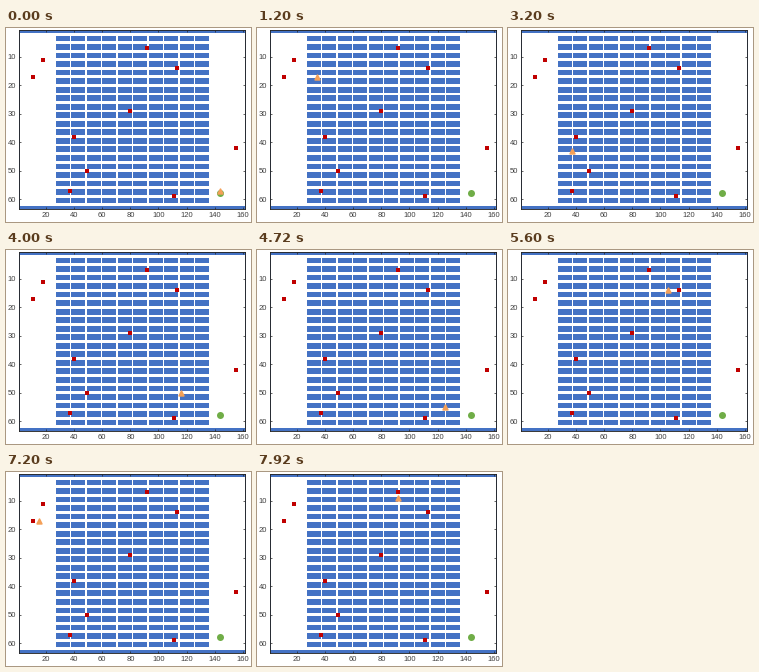
Recreate the animation shown at these times as a matplotlib script. Size 245 by 194 pixels, loop 8000 ms.

```python
import numpy as np
import matplotlib.pyplot as plt
from matplotlib.animation import FuncAnimation
from matplotlib.colors import ListedColormap
from matplotlib.markers import MarkerStyle

W, H, DPI = 245, 194, 100
PT = 72 / DPI
COLS, ROWS = 161, 63
BLUE, RED, GREEN, ORANGE = "#4472C4", "#C00000", "#70AD47", "#F4A058"
FRAMES, INTERVAL, CELLS_PER_FRAME = 100, 80, 10

HOME = (144, 58)
ITEMS = [(11, 17), (18, 11), (92, 7), (113, 14), (80, 29),
         (40, 38), (37, 57), (49, 50), (155, 42), (111, 59)]

# Outer wall, then shelves of 10 by 2 cells with one-cell aisles between them.
row, col = np.mgrid[1:ROWS + 1, 1:COLS + 1]
wall = (row == 1) | (row == ROWS) | (col == 1) | (col == COLS)
shelf = (abs(col - 81) <= 54) & (abs(row - 32) < 30) & (col % 11 != 4) & (row % 3 != 2)
blocked = wall | shelf


def neighbours(cell):
    """Free cells next to this one, sideways moves first."""
    x, y = cell
    around = [(x - 1, y), (x + 1, y), (x, y - 1), (x, y + 1)]
    return [(a, b) for a, b in around if not blocked[b - 1, a - 1]]


def shortest_path(start, goal):
    """Breadth-first search back from the goal, then walk downhill to it."""
    distance, queue = {goal: 0}, [goal]
    for cell in queue:
        if cell == start:
            break
        for near in neighbours(cell):
            if near not in distance:
                distance[near] = distance[cell] + 1
                queue.append(near)
    path, cell = [], start
    while cell != goal:
        cell = next(n for n in neighbours(cell) if distance.get(n) == distance[cell] - 1)
        path.append(cell)
    return path or [goal]


# Items in picking order with a few turning points; a repeat is a one-step stop.
pick = ITEMS
upper = [(18, 8), pick[2]]
middle = [pick[3]] * 3 + [(92, 23)] + pick[4:7]
route = [HOME, (144, 17), *pick[:2], *upper, pick[2], *middle,
         pick[7], (137, 42), pick[8], (125, 55), pick[9], pick[9],
         pick[2], *middle,
         (18, 20), pick[0], pick[0], pick[1], pick[1], *upper, (92, 23)]
steps = [HOME]
for start, goal in zip(route, route[1:]):
    steps += shortest_path(start, goal)

fig = plt.figure(figsize=(W / DPI, H / DPI), dpi=DPI, facecolor="white")
left, right, top, bottom = 12.5, 239, 2, 181
ax = fig.add_axes([left / W, 1 - bottom / H, (right - left) / W, (bottom - top) / H])
ax.imshow(blocked, cmap=ListedColormap(["white", BLUE]), aspect="auto",
          interpolation="nearest", extent=(0.5, COLS + 0.5, ROWS + 0.5, 0.5))


def marker(cells, shape, color, size, zorder, edge=0):
    xs, ys = zip(*cells)
    line, = ax.plot(xs, ys, ls="", marker=MarkerStyle(shape, joinstyle="round"),
                    color=color, ms=size * PT, mew=edge * PT, snap=False, zorder=zorder)
    return line


marker([HOME], "o", GREEN, 7, 3)
agent = marker([steps[1]], "^", ORANGE, 4.8, 4, edge=1.6)
marker(ITEMS, "s", RED, 4.6, 5)

ax.set_xticks(range(20, COLS, 20))
ax.set_yticks(range(10, ROWS, 10))
ax.tick_params(direction="in", top=True, right=True, length=2 * PT,
               width=0.7 * PT, pad=2.6 * PT, color="#262626",
               labelcolor="#404040", labelsize=7.6 * PT,
               labelfontfamily="Liberation Sans")
for spine in ax.spines.values():
    spine.set(linewidth=0.9 * PT, color="#262626")


def update(frame):
    x, y = steps[CELLS_PER_FRAME * frame + 1]
    agent.set_data([x], [y])
    return agent,


anim = FuncAnimation(fig, update, frames=FRAMES, interval=INTERVAL,
                     repeat=True, repeat_delay=0)
plt.show()
```
